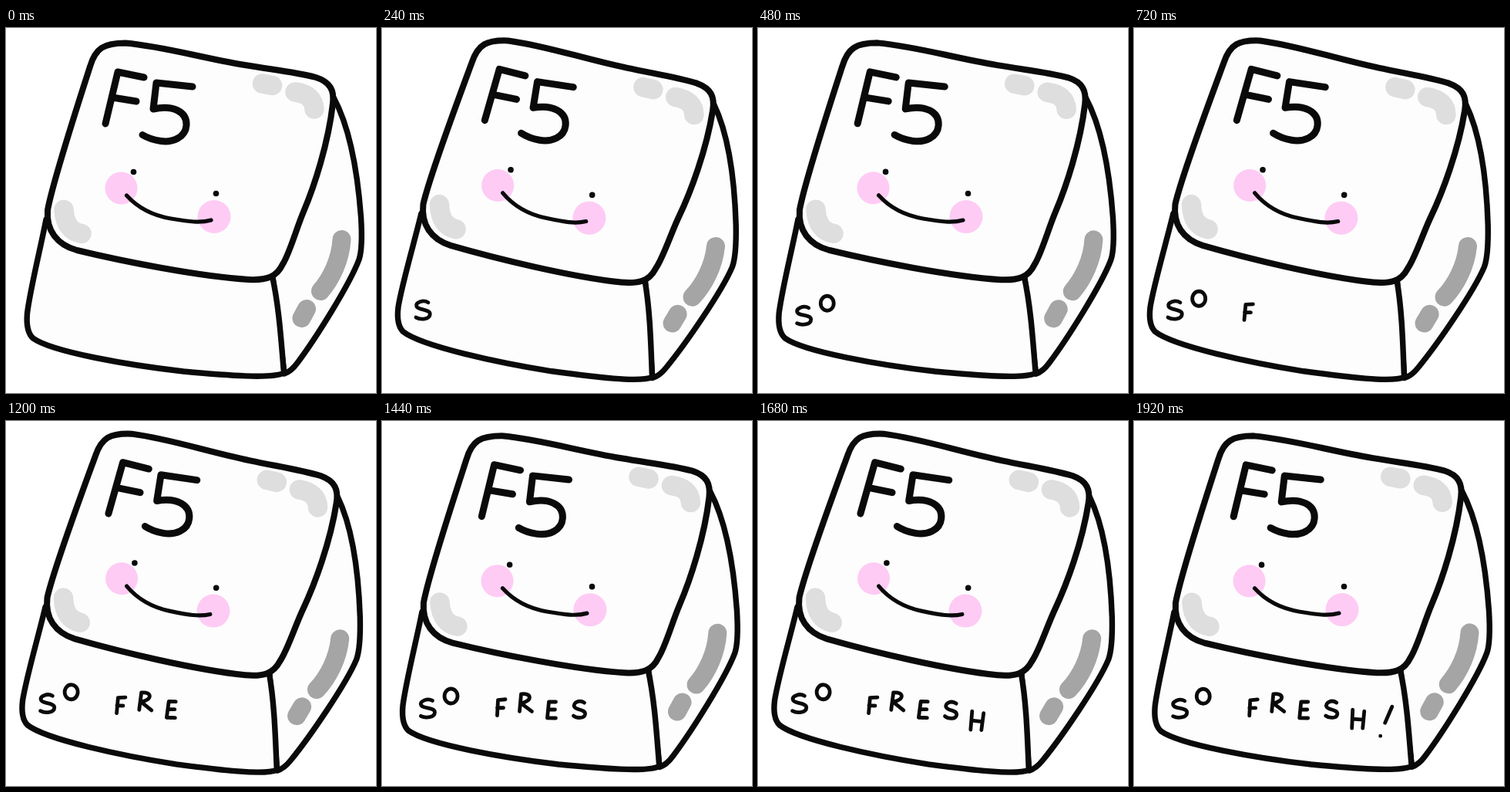
These frames come from a looping animation (480 by 473 pixels, 2160 ms). An HTML page:

```html
<!DOCTYPE html>
<html lang="en">
<head>
<meta charset="utf-8">
<title>F5, so fresh!</title>
<style>
  html, body { margin: 0; height: 100%; overflow: hidden; background: #fff; }
  svg { display: block; width: 100%; height: 100%; }
  path, ellipse { fill: none; stroke: #0a0a0a; stroke-linecap: round; stroke-linejoin: round; }
  .cap path { fill: #fdfdfd; stroke-width: 7.4; }
  .cap .top { stroke-width: 8; }
  .shine path { stroke: #dedede; stroke-width: 25.5; }
  .shade path { stroke: #a5a5a5; stroke-width: 24; }
  .cheeks { fill: #fecbf5; }
  .label { stroke-width: 9; }
  .smile { stroke-width: 5.2; }
  .eyes { fill: #0a0a0a; }
  #letters > * { stroke-width: 4.8; }
</style>
</head>
<body>
<svg viewBox="0 0 480 473">
  <g id="key">
    <g class="cap">
      <path d="M425 90C445 127 456 185 460.500 245Q463 285 458 300C446 332 402 402 378 434Q370 445 361 448L346 322Z"/>
      <path d="M52 248C46 280 31 340 27.500 370Q25.500 393 35 402C60 420 160 437 230 445C285 450 345 455 360.500 447C357 405 354 360 345.500 322Z"/>
      <path class="top" d="M109 50C116 26 127 19.500 155 19.500C205 24 250 38 310 48C345 54 375 57 402 64C421 70 426 81 424 98C418 150 400 205 386 238C377 259 368 292 359 306C351 323 338 327 315 326C250 322 150 302 92 288C66 281 52 262 54 236C61 198 92 103 109 50Z"/>
    </g>
    <g class="shine">
      <path d="M332.500 72L345.500 74.500"/>
      <path d="M375 83Q399 86 400 105"/>
      <path d="M75 235.500Q77 263 98 266.500"/>
    </g>
    <g class="shade">
      <path d="M435.500 274C434 300 422 325 408 341"/>
      <path d="M390 364L383.500 376"/>
    </g>
    <g class="cheeks">
      <circle cx="149.500" cy="207.500" r="21"/>
      <circle cx="270" cy="244.500" r="21.500"/>
    </g>
    <path class="label" d="M129 124L145 57L179 64M138 90L169 95"/>
    <path class="label" d="M242 76L195 71L191 105C217 99 235 109 234 126C233 142 216 148.500 201 146.500Q187 144.500 177 138.500"/>
    <path class="smile" d="M156.500 217C172 234 190 243 214 247S252 253 266 249"/>
    <g class="eyes">
      <circle cx="165.500" cy="186.500" r="3.800"/>
      <circle cx="272.500" cy="214.500" r="3.800"/>
    </g>
    <g id="letters">
      <path d="M66 363C59 359 50 364 51 368C52 374 69 371 69 378C69 385 57 386 51 383"/>
      <ellipse cx="90" cy="357" rx="8.500" ry="9.500"/>
      <path d="M151 362L150 382M151 362L160.500 361M150 372L158 372"/>
      <path d="M181 354L179 376.500M181 354C195 352 196 363 181 366L195 376.500"/>
      <path d="M226 364L217 364L215 385L226 385M216 374L225 374"/>
      <path d="M263 365C256 360 248 366 250 370C252 375 265 373 264 380C263 386 253 385 249 382"/>
      <path d="M284 374L283 398M299 376L297 398M284 386L298 387"/>
      <path d="M335 370L326 391M320 408h.01"/>
    </g>
  </g>
</svg>
<script>
  const STEP = 240;
  const angles = [0, 2.5, 0.1, 2.5, 0.2, 2.3, 0.2, 2.3, 0.1];
  const key = document.getElementById("key");
  const letters = [...document.getElementById("letters").children];

  function draw() {
    const step = Math.floor(performance.now() / STEP) % angles.length;
    key.setAttribute("transform", `rotate(${angles[step]} 230 220)`);
    letters.forEach((letter, i) => letter.style.display = i < step ? "" : "none");
    requestAnimationFrame(draw);
  }
  draw();
</script>
</body>
</html>
```
